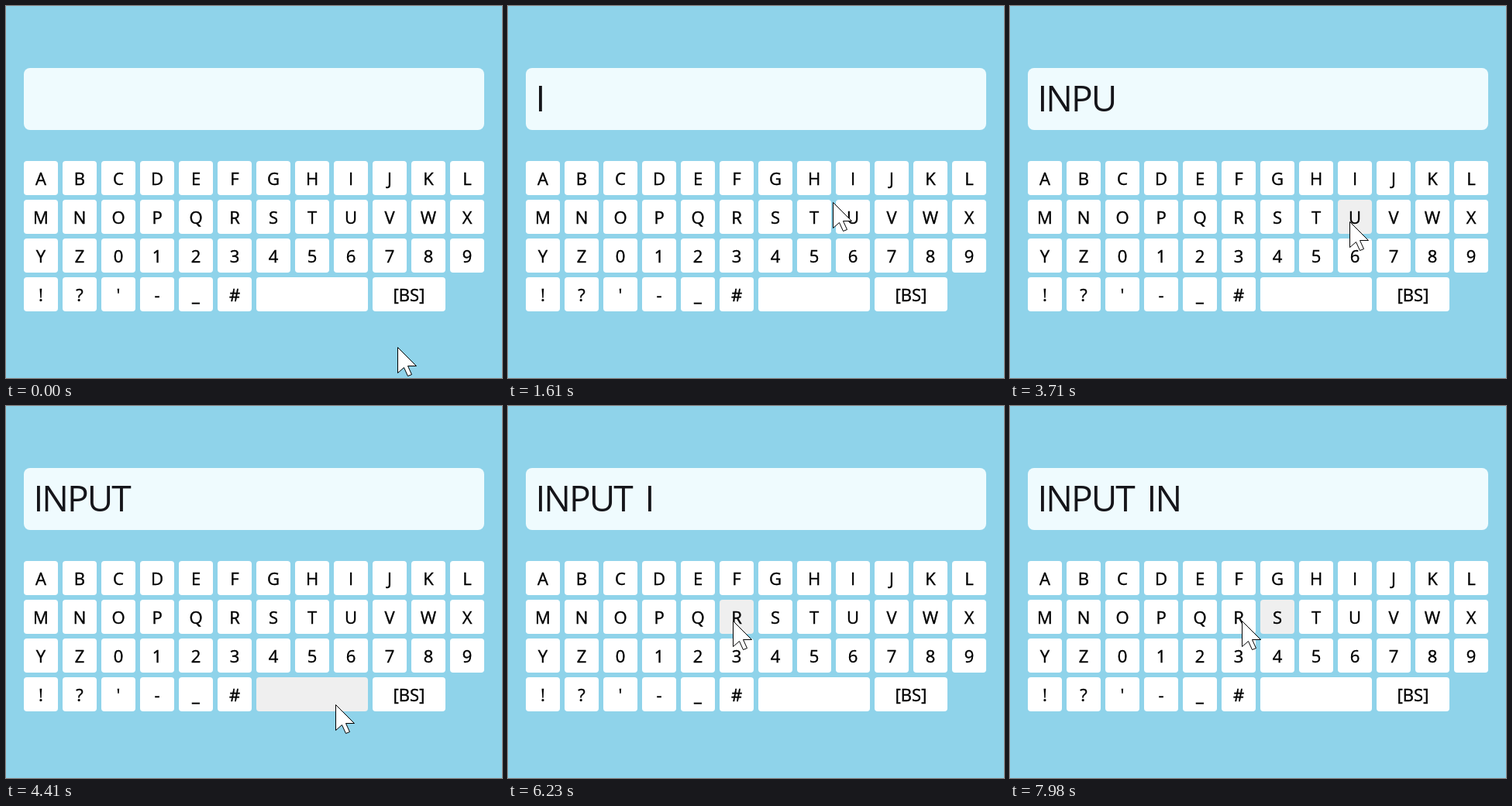
An HTML page with a canvas for the animation above (8000 ms loop, 640x480 px).

```html
<!DOCTYPE html>
<html lang="en">
<head>
<meta charset="utf-8">
<title>On-screen keyboard</title>
<style>
html, body { margin: 0; width: 100%; height: 100%; overflow: hidden; background: #8fd3ea; }
canvas { display: block; }
</style>
</head>
<body>
<canvas id="stage" width="640" height="480"></canvas>
<script>
const ctx = document.getElementById('stage').getContext('2d');
const LOOP = 8000, STEP = 70, HOLD = 140;
const FACE = '"Open Sans", "Noto Sans", sans-serif';

// Keyboard: twelve columns on a 50 px pitch, two wide keys in the last row.
const keys = [..."ABCDEFGHIJKLMNOPQRSTUVWXYZ0123456789!?'-_#"].map((label, i) => ({
  label, x: 23 + i % 12 * 50, y: 200 + Math.floor(i / 12) * 50, w: 44, h: 44
}));
keys.push({ label: ' ', x: 323, y: 350, w: 144, h: 44 });
keys.push({ label: '[BS]', x: 473, y: 350, w: 94, h: 44 });

// The pointer glides from stop to stop. A stop with a key rests there
// and types the key at the end of the rest.
const via = (t, x, y) => ({ from: t, to: t, x, y });
const press = (key, from, to, x, y) => ({ key, from, to, x, y });
const stops = [
  via(0, 505, 440),
  via(420, 462, 366),
  press('I', 840, 1260, 440, 224),
  via(1610, 419, 253),
  press('N', 2170, 2450, 98, 275),
  press('P', 2870, 3080, 190, 275),
  via(3220, 421, 293),
  press('U', 3500, 3710, 438, 278),
  press('T', 3990, 4200, 398, 276),
  press(' ', 4410, 4760, 425, 385),
  via(5040, 437, 255),
  press('I', 5180, 5390, 440, 224),
  via(6230, 290, 277),
  via(6370, 272, 276),
  press('N', 6790, 7140, 97, 275),
  via(7665, 446, 272),
  via(8050, 285, 277)
];
const presses = stops.filter(s => s.key);
const path = stops.flatMap(({ from, to, x, y }) =>
  from === to ? [{ t: from, x, y }] : [{ t: from, x, y }, { t: to, x, y }]);

const slope = (a, b, axis) => (b[axis] - a[axis]) / (b.t - a.t);

// Smooth tangent that never overshoots a stop
function tangent(i, axis) {
  if (i === 0 || i === path.length - 1) return 0;
  const a = slope(path[i - 1], path[i], axis), b = slope(path[i], path[i + 1], axis);
  return a * b > 0 ? 2 * a * b / (a + b) : 0;
}

function pointer(t) {
  t = Math.max(0, t);
  const i = path.findLastIndex(p => p.t <= t);
  const a = path[i], b = path[i + 1], d = b.t - a.t;
  const u = (t - a.t) / d, v = 1 - u;
  const at = axis => Math.round(
    a[axis] * v * v * (1 + 2 * u) + b[axis] * u * u * (1 + 2 * v)
    + d * u * v * (v * tangent(i, axis) - u * tangent(i + 1, axis)));
  return { x: at('x'), y: at('y') };
}

function box(x, y, w, h, r, color) {
  ctx.fillStyle = color;
  ctx.beginPath();
  ctx.roundRect(x, y, w, h, r);
  ctx.fill();
}

function drawKeys(t) {
  const p = pointer(t - STEP); // hover trails the pointer by one step
  const held = presses.find(s => t >= s.to - HOLD && t < s.to)?.key;
  ctx.font = '500 22px ' + FACE;
  ctx.textAlign = 'center';
  ctx.letterSpacing = ctx.wordSpacing = '0px';
  ctx.strokeStyle = '#000';
  ctx.lineWidth = 0.4;
  for (const { label, x, y, w, h } of keys) {
    const hover = p.x >= x && p.x < x + w && p.y >= y && p.y < y + h;
    box(x, y, w, h, 4, held === label ? '#dfdfdf' : hover ? '#efefef' : '#fff');
    ctx.fillStyle = '#000';
    ctx.fillText(label, x + w / 2, y + 30.5);
    ctx.strokeText(label, x + w / 2, y + 30.5);
  }
}

function drawField(t) {
  box(23, 80, 594, 80, 8, '#effbfe');
  ctx.font = '400 46px ' + FACE;
  ctx.textAlign = 'left';
  ctx.letterSpacing = '-2px';
  ctx.wordSpacing = '7px';
  ctx.fillStyle = '#15151a';
  const typed = presses.filter(s => t >= s.to).map(s => s.key).join('');
  ctx.fillText(typed, 35.5, 136);
}

function drawPointer(t) {
  const { x, y } = pointer(t);
  ctx.save();
  ctx.translate(x + 0.5, y + 0.5);
  const arrow = new Path2D('M0 0V33L8 26L13 37L18 35L13 24H24Z');
  ctx.fillStyle = '#fff';
  ctx.fill(arrow);
  ctx.strokeStyle = '#000';
  ctx.lineWidth = 1;
  ctx.stroke(arrow);
  ctx.restore();
}

function draw(now) {
  const t = Math.floor(now % LOOP / STEP) * STEP;
  ctx.fillStyle = '#8fd3ea';
  ctx.fillRect(0, 0, 640, 480);
  drawField(t);
  drawKeys(t);
  drawPointer(t);
}

let start;
function tick(now) {
  start ??= now;
  draw(now - start);
  requestAnimationFrame(tick);
}
draw(0);
requestAnimationFrame(tick);
</script>
</body>
</html>
```
